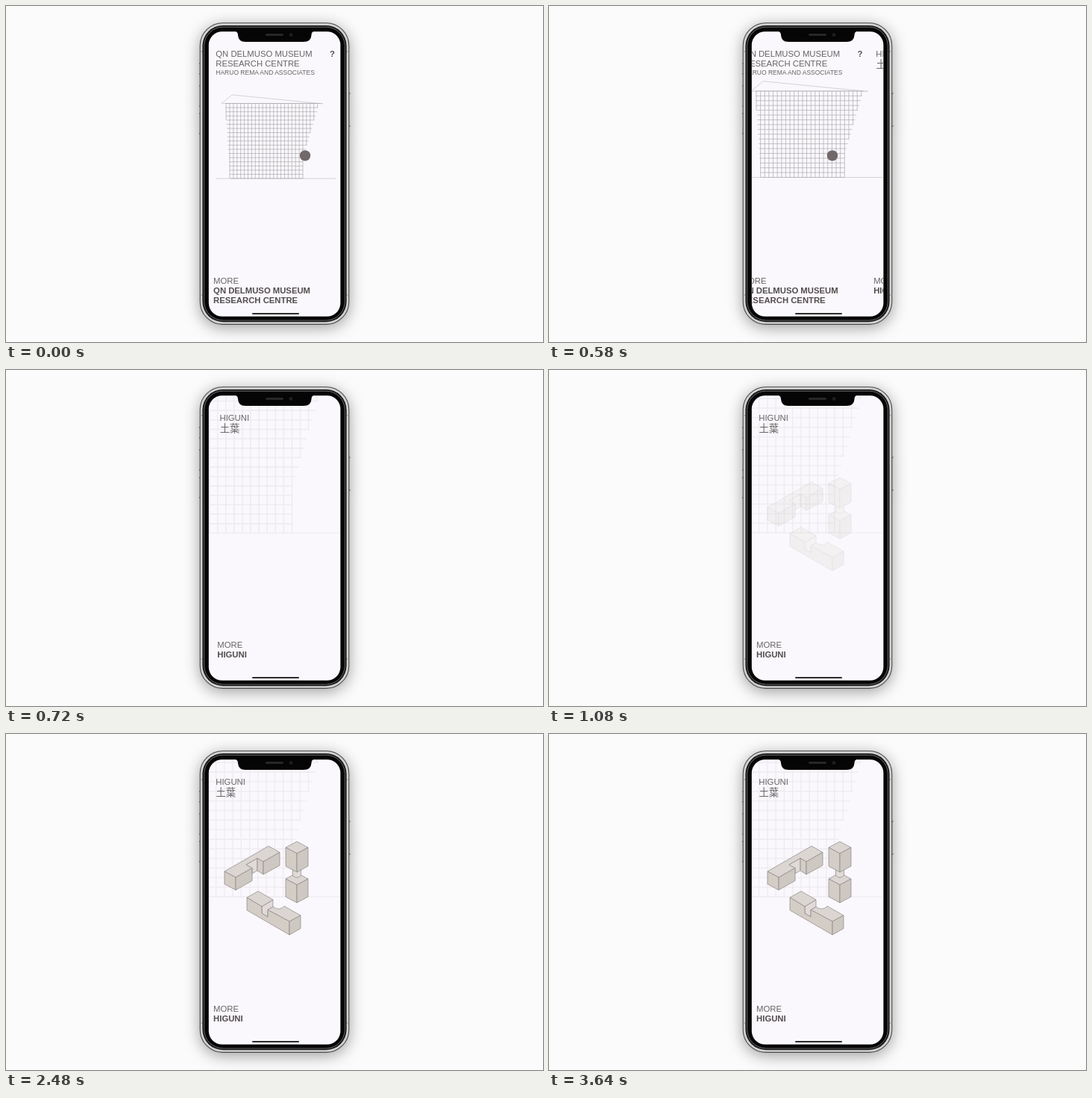
An HTML page for the animation above (4000 ms loop, 720 by 450 pixels).

```html
<!DOCTYPE html>
<html lang="en">
<head>
<meta charset="utf-8">
<title>Museum app</title>
<style>
  html, body { margin: 0; width: 100%; height: 100%; overflow: hidden; background: #fbfbfb; }
  svg { display: block; width: 720px; height: 450px; }
  text { font: 11.3px "Liberation Sans", Arial, sans-serif; fill: #696465; }
  .bold { font-weight: 700; fill: #534d4e; }
  .small { font-size: 8.5px; }
  .kanji { font: 300 13.3px "Noto Sans CJK JP", "Noto Sans CJK", sans-serif; }
  #shell { filter: drop-shadow(0 4px 10px rgba(0, 0, 0, .36)); }
  #building { fill: none; stroke: #a39fa3; stroke-width: .6; }
  #outline { stroke: #bdb9bd; }
  #blocks path { stroke: #8b8684; stroke-width: .7; stroke-linejoin: round; }
  #blocks .top { fill: #dcd6d3; }
  #blocks .left { fill: #d3cdc6; }
  #blocks .right { fill: #cec8c2; }
  #blocks .inner { fill: #e0dbd8; }
</style>
</head>
<body>
<svg viewBox="0 0 720 450">
  <defs>
    <clipPath id="screen"><rect x="271.8" y="34.2" width="176.6" height="381.6" rx="18"/></clipPath>
  </defs>

  <g id="shell">
    <path d="M259.800 77V91M259.800 107V134M259.800 144V171M460.400 117V161" stroke="#bbb" stroke-width="1.200"/>
    <path d="M259 77h2M259 91h2M259 107h2M259 134h2M259 144h2M259 171h2M459.500 117h2M459.500 161h2" stroke="#333"/>
    <rect x="260.2" y="22.8" width="199.6" height="403.6" rx="30.5" fill="#d2d2d2" stroke="#4a4a4a" stroke-width="1.1"/>
    <path d="M260 61h4M456 61h4M260 387h4M456 387h4" stroke="#888" stroke-width=".8"/>
    <rect x="263.4" y="26" width="193.2" height="397.2" rx="27.500" fill="#161616"/>
    <rect x="265.8" y="28.2" width="188.4" height="392.8" rx="25" fill="none" stroke="#686868"/>
    <rect x="266.6" y="29" width="186.8" height="391.2" rx="24" fill="#050505"/>
  </g>

  <g clip-path="url(#screen)">
    <rect x="271" y="34" width="178" height="383" fill="#faf8fc"/>
    <g id="building">
      <path id="outline" d="M281 231H442M425 131L303 119L289 130.5H425"/>
      <path id="grid"/>
    </g>
    <g id="blocks">
      <path class="top" d="M293 184L352 150L367 158.5L345 171L337 166.5L322 175L330 179.5L308 192Z"/>
      <path class="left" d="M293 184L308 192V209L293 201Z"/>
      <path class="inner" d="M322 175L337 166.5V183L330 187V179.5Z"/>
      <path class="left" d="M337 166.5L345 171V188L337 183Z"/>
      <path class="right" d="M308 192L330 179.5V196.5L308 209Z"/>
      <path class="right" d="M345 171L367 158.5V176L345 188Z"/>

      <path class="top" d="M375 194L390 186L405 194L390 202Z"/>
      <path class="left" d="M375 194L390 202V226L375 218Z"/>
      <path class="right" d="M390 202L405 194V218L390 226Z"/>
      <path class="inner" d="M384.5 178V189.5Q390 195 395.5 189.5V178Z"/>
      <path class="top" d="M375 152L390 144L405 152L390 160Z"/>
      <path class="left" d="M375 152L390 160V185L375 177Z"/>
      <path class="right" d="M390 160L405 152V177L390 185Z"/>

      <path class="inner" d="M343 231L358 222V231.5L351 235.5V245L343 240Z"/>
      <path class="top" d="M323 219L338 210.5L358 222L343 231Z"/>
      <path class="top" d="M351 235.5L358 231.5Q367 237.5 373 230.5L395 243L380 251Z"/>
      <path class="left" d="M323 219L343 231V240L351 245V235.5L380 251V269L323 236Z"/>
      <path class="right" d="M380 251L395 243V260.5L380 269Z"/>
    </g>
    <g id="pages">
      <text x="281.3" y="68">QN DELMUSO MUSEUM</text>
      <text x="281.3" y="81">RESEARCH CENTRE</text>
      <text x="281.3" y="91.6" class="small">HARUO REMA AND ASSOCIATES</text>
      <text x="434" y="68" class="bold">?</text>
      <text x="278.1" y="372">MORE</text>
      <text x="278.1" y="385" class="bold">QN DELMUSO MUSEUM</text>
      <text x="278.1" y="398" class="bold">RESEARCH CENTRE</text>
      <g transform="translate(177.5)">
        <text x="281.3" y="68">HIGUNI</text>
        <text x="281.5" y="83.2" class="kanji">土葉</text>
        <text x="278.1" y="372">MORE</text>
        <text x="278.1" y="385" class="bold">HIGUNI</text>
      </g>
    </g>
    <circle id="touch" cx="401" cy="200.4" r="7.2" fill="#716869"/>
  </g>

  <path d="M306 33.5Q311 34 311 39Q311.500 48 321 48H399Q409 48 409.500 39Q409.500 34 414 33.5Z" fill="#050505"/>
  <rect x="348" y="37" width="24" height="3" rx="1.500" fill="#272727"/>
  <circle cx="382" cy="38.500" r="2.500" fill="#1c1c22"/>
  <rect x="330" y="411.200" width="63" height="1.800" rx=".9" fill="#111"/>
</svg>
<script>
  const LOOP = 4000, PAGE = 177.5;
  const BASE = { x: 398, y: 231 };
  const el = id => document.getElementById(id);
  const [building, blocks, pages, touch] = ['building', 'blocks', 'pages', 'touch'].map(el);
  const clamp = v => Math.min(1, Math.max(0, v));

  // Facade grid: a leaning left wall and a stepped overhang on the right.
  function facade() {
    const rows = 18, rowHeight = 100.5 / rows, colWidth = 4.9;
    const left = h => 300.5 - h * .065;
    const right = h => BASE.x + Math.max(0, h - 26) * .297;
    let d = '';
    for (let r = 0; r <= rows; r++) {
      const h = r * rowHeight;
      d += `M${left(h)} ${BASE.y - h}H${right(h)}`;
    }
    for (let k = -21; k <= 4; k++) {
      const x = BASE.x + k * colWidth;
      let low = 0;
      while (low < rows && (x < left(low * rowHeight) - .6 || x > right(low * rowHeight) + .6)) low++;
      if (low < rows) d += `M${x} ${BASE.y - low * rowHeight}V${BASE.y - rows * rowHeight}`;
    }
    return d;
  }

  // Slow drag, quick flick, soft landing.
  const swipe = t => t < 520 ? 0 : 1 - Math.exp(-(((t - 520) / 128.5) ** 2.82));

  function draw(t) {
    const p = swipe(t);
    const scale = 1 + 1.3 * p;
    pages.setAttribute('transform', `translate(${-PAGE * p})`);
    building.setAttribute('transform',
      `translate(${BASE.x - 15 * p} ${BASE.y - 13 * p}) scale(${scale}) translate(${-BASE.x} ${-BASE.y})`);
    building.setAttribute('opacity', 1 - .88 * p);
    touch.setAttribute('cx', 401 - PAGE * p * 1.03);
    touch.setAttribute('opacity', 1 - clamp((t - 620) / 60));
    const fade = clamp((t - 1020) / 580);
    blocks.setAttribute('opacity', 1 - (1 - fade) ** 2);
  }

  el('grid').setAttribute('d', facade());
  const start = performance.now();
  function tick() {
    draw((performance.now() - start) % LOOP);
    requestAnimationFrame(tick);
  }
  draw(0);
  requestAnimationFrame(tick);
</script>
</body>
</html>
```
